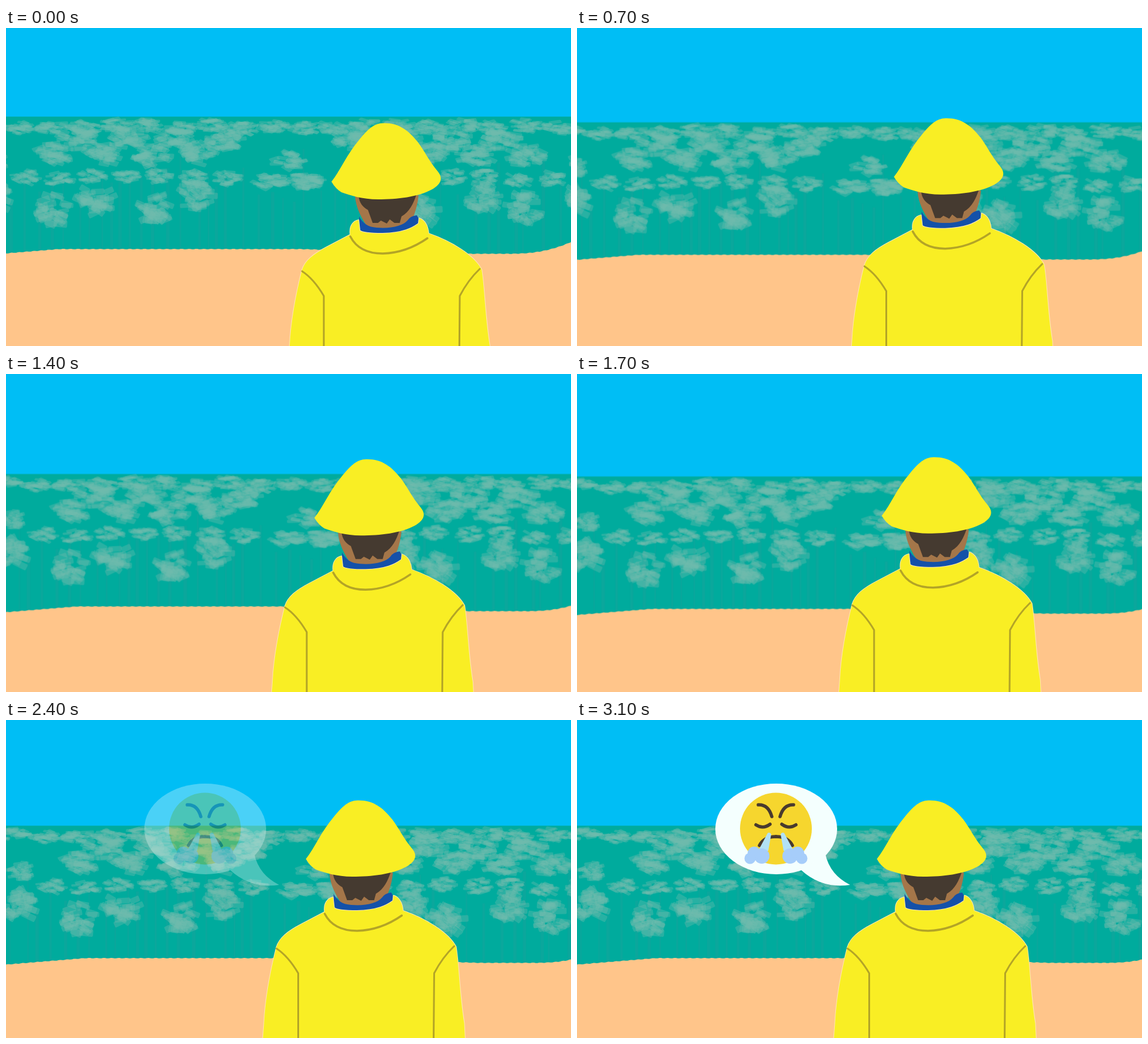
An HTML page with a canvas that plays this animation: 960 px wide and 540 px high, repeating every 6.1 s.

```html
<!DOCTYPE html>
<html lang="en">
<head>
<meta charset="utf-8">
<title>At the shore</title>
<style>
html, body { margin: 0; width: 100%; height: 100%; overflow: hidden; background: #00bef5; }
canvas { display: block; }
</style>
</head>
<body>
<canvas id="stage" width="960" height="540"></canvas>
<script>
const W = 960, H = 540, LOOP = 6100, STEP = 100, MOVE_STEPS = 21, FADE_STEPS = 10;
const LAND_SHIFT = 44, LAND_DROP = 29, HORIZON = 150.5, PAD = 64;
const SKY = '#00bef5', SEA = '#00ab9d', SAND = '#ffc58a', YELLOW = '#f9ee24', SEAM = '#b3a427';
const INK = '#493a2e', STEAM = '#b2e1f5', PUFF = '#a6cdfa';

const ctx = document.getElementById('stage').getContext('2d');
const clamp = (v, lo = 0, hi = 1) => Math.max(lo, Math.min(hi, v));

function random(seed) {
  return () => {
    seed = (seed * 1664525 + 1013904223) >>> 0;
    return seed / 4294967296;
  };
}

function layer(w, h) {
  const canvas = Object.assign(document.createElement('canvas'), { width: w, height: h });
  return [canvas, canvas.getContext('2d')];
}

function fill(c, color, path) {
  c.fillStyle = color;
  c.fill(new Path2D(path));
}

function stroke(c, color, width, path) {
  c.strokeStyle = color;
  c.lineWidth = width;
  c.lineCap = c.lineJoin = 'round';
  c.stroke(new Path2D(path));
}

function disc(c, color, x, y, rx, ry = rx) {
  c.beginPath();
  c.ellipse(x, y, rx, ry, 0, 0, 7);
  c.fillStyle = color;
  c.fill();
}

// A tree crown: overlapping tilted leaves, flattened with distance
function crown(c, rnd, x, y, w, h) {
  const count = 18 + w * 0.25;
  for (let i = 0; i < count; i++) {
    const a = rnd() * Math.PI * 2, r = Math.sqrt(rnd()) * 0.4;
    const len = w * (0.24 + rnd() * 0.14), thick = w * (0.11 + rnd() * 0.07);
    c.save();
    c.translate(x + Math.cos(a) * r * w, y + Math.sin(a) * r * h);
    c.scale(1, Math.min(1, h / w + 0.08));
    c.rotate((rnd() - 0.4) * 1.3);
    c.fillStyle = 'rgba(112,186,172,.36)';
    c.beginPath();
    c.roundRect(-len / 2, -thick / 2, len, thick, 2);
    c.fill();
    c.restore();
  }
}

// The wood is nearly symmetric, so each crown has a twin across the middle
function crowns(c, rnd, x, y, w, h) {
  for (const px of [x, 961 - x]) crown(c, rnd, px, y + (rnd() - 0.5) * 6, w, h);
}

function wood(c) {
  const rnd = random(41);
  for (let x = -30; x < 500; x += 54) crowns(c, rnd, x, 167, 60, 27);
  for (let x = 78, i = 0; x < 400; x += 42, i++) crowns(c, rnd, x, i % 2 ? 188 : 214, 72, 46);
  for (let x = 33; x < 420; x += 57) crowns(c, rnd, x, 254, 52, 30);
  crowns(c, rnd, -18, 228, 48, 40);
  crowns(c, rnd, 450, 259, 70, 32);
  crown(c, rnd, 480, 226, 62, 36);
  crown(c, rnd, 514, 264, 48, 28);
  for (const x of [-22, 80, 152, 256, 322]) crowns(c, rnd, x, 298 + 12 * Math.cos(x / 28 - 2.6), 68, 66);
}

function sandTop(x) {
  const left = 13 * clamp((90 - x) / 160);
  const middle = 8 * clamp((x - 500) / 260);
  const right = 21 * clamp((x - 850) / 112, 0, 2) ** 2.5;
  return 375.4 + left + middle - right + Math.sin(x / 2) * 0.4;
}

function makeLand() {
  const [canvas, c] = layer(W + PAD, 580), rnd = random(7);
  c.translate(PAD, 0);
  c.fillStyle = SEA;
  c.fillRect(-PAD, HORIZON, W + PAD, 300);
  c.fillStyle = 'rgba(70,145,150,.16)';
  for (let x = -PAD; x < W; x += 12 + rnd() * 22) {
    const top = 200 + rnd() * 100;
    c.fillRect(x, top, 2 + rnd() * 4, 390 - top);
  }
  c.save();
  c.beginPath();
  c.rect(-PAD, HORIZON - 3, W + PAD, 400);
  c.clip();
  wood(c);
  c.restore();
  c.beginPath();
  c.moveTo(-PAD, 580);
  for (let x = -PAD; x <= W; x++) c.lineTo(x, sandTop(x));
  c.lineTo(W, 580);
  c.fillStyle = SAND;
  c.fill();
  return canvas;
}

function makeBubble() {
  const [canvas, c] = layer(W, H);
  const mirrored = part => {
    for (const side of [1, -1]) {
      c.save();
      c.scale(side, 1);
      part();
      c.restore();
    }
  };
  c.translate(338, 185);
  disc(c, '#f4fffe', 0.5, 0, 103.5, 77);
  fill(c, '#f4fffe', 'M84 43Q92 78 126 95Q78 102 43 70Z');
  disc(c, '#f6d62e', 0, -0.5, 61);
  mirrored(() => {
    stroke(c, INK, 5.5, 'M-30-41Q-13-42-7-21');
    stroke(c, INK, 5.5, 'M-34-7Q-22 1-10-8');
    stroke(c, INK, 5.5, 'M-28 28Q-20 13 0 13');
  });
  mirrored(() => {
    fill(c, STEAM, 'M-14 7Q-10 5-8 9L-13 37H-30Z');
    disc(c, PUFF, -24, 46, 13);
    disc(c, PUFF, -37, 41, 11);
    disc(c, PUFF, -44, 50, 9.5);
  });
  return canvas;
}

function drawPerson(c) {
  fill(c, '#a47649', 'M593 286C595 306 603 322 617 342H681C692 325 699 305 701 284Z');
  fill(c, '#453a30', 'M599 284C600 297 606 304 615 309L623 331 632 331 637 327 647 332 652 325 660 331 669 331 672 320C686 312 692 298 697 284Z');
  fill(c, '#1451a9', 'M600 320C606 331 614 338 630 339C655 341 674 336 682 327Q687 319 698 318Q704 326 701 337C690 349 655 352 606 352Q600 346 600 320Z');

  const coat = 'M585 351C583 336 590 328 599 326L601 344Q606 349 640 349C675 348 690 340 701 332L702 323Q716 328 718 349' +
    'C755 362 795 385 808 410C813 440 814 490 822 540L824 580H479L482 540C484 500 492 455 503 411C508 395 522 384 545 372Z';
  stroke(c, '#ffe7ae', 2, coat);
  fill(c, YELLOW, coat);
  stroke(c, SEAM, 3, 'M503 413Q523 426 540 455V580');
  stroke(c, SEAM, 3, 'M805 409Q785 428 771 455L770 580');
  stroke(c, SEAM, 3.5, 'M585 354Q600 383 640 383Q680 382 716 357');

  fill(c, YELLOW, 'M553 261C568 242 580 213 600 190C616 171 625 162 641 161.5C668 161 684 174 700 194C712 210 718 225 734 244' +
    'C742 254 741 264 724 274C700 287 665 291 632 291C605 291 585 284 570 279Q560 273 553 261Z');
}

const land = makeLand(), bubble = makeBubble();

function draw(step) {
  const move = clamp(step / MOVE_STEPS);
  ctx.fillStyle = SKY;
  ctx.fillRect(0, 0, W, H);
  ctx.drawImage(land, LAND_SHIFT * move - PAD, LAND_DROP * move);

  ctx.save();
  ctx.translate(-43.5 * move, -25 * move);
  drawPerson(ctx);
  ctx.restore();

  ctx.globalAlpha = clamp((step - MOVE_STEPS) / FADE_STEPS);
  ctx.drawImage(bubble, 0, 0);
  ctx.globalAlpha = 1;
}

let start, last = -1;
function tick(now) {
  start ??= now;
  const step = Math.floor(((now - start) % LOOP) / STEP);
  if (step !== last) draw(last = step);
  requestAnimationFrame(tick);
}
draw(0);
requestAnimationFrame(tick);
</script>
</body>
</html>
```
